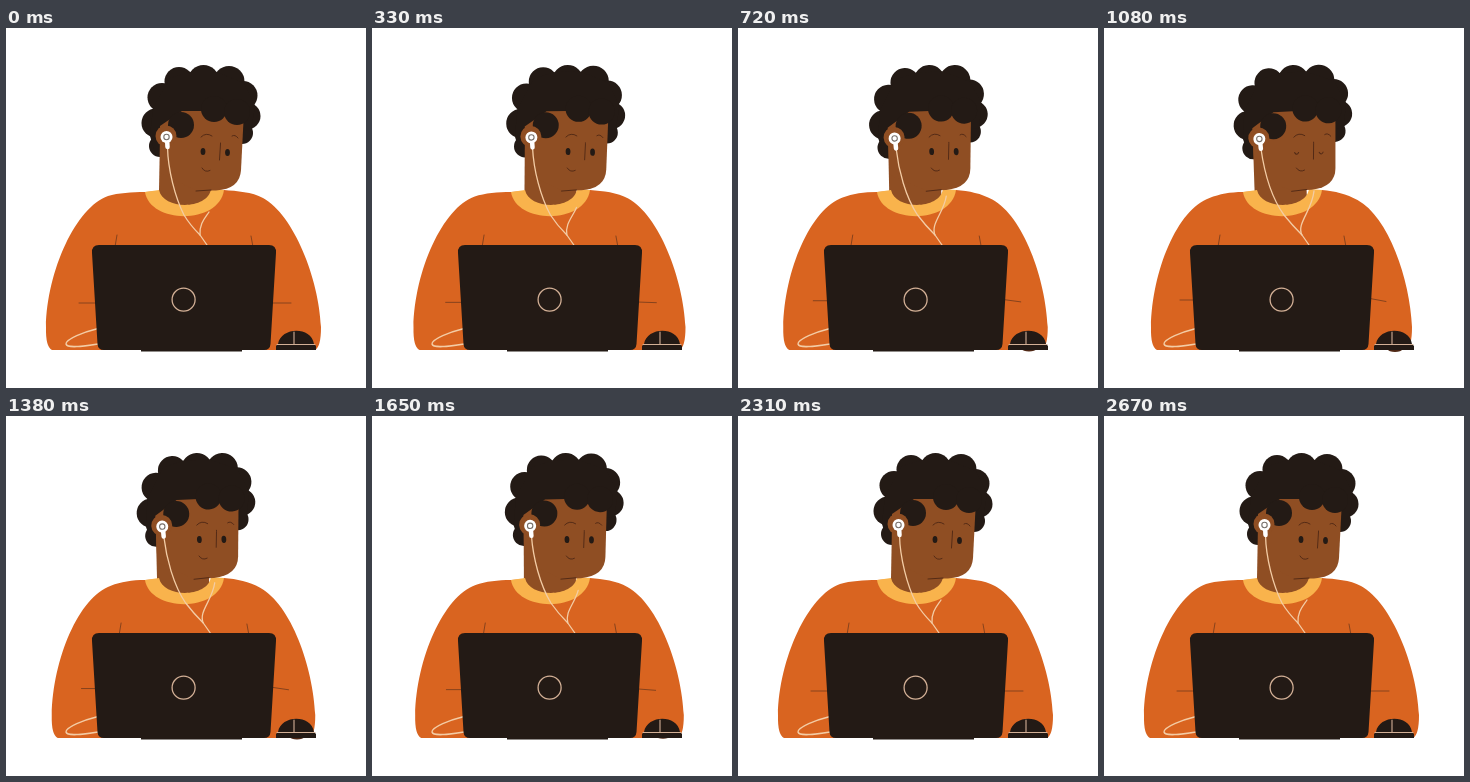
Animation of 360x360 px, one loop 2.7 s. Source, as an HTML page with a canvas:

```html
<!DOCTYPE html>
<html lang="en">
<head>
<meta charset="utf-8">
<title>Listening at the laptop</title>
<style>
html, body { margin: 0; width: 100%; height: 100%; overflow: hidden; background: #fff; }
canvas { display: block; width: 100vmin; height: 100vmin; }
</style>
</head>
<body>
<canvas id="stage" width="360" height="360"></canvas>
<script>
const ctx = document.getElementById('stage').getContext('2d');
const LOOP = 2700, SWAY = 2160;
const DARK = '#231a15', SKIN = '#8f4e23', LINE = '#4f2815', FOLD = '#7d3f1c';
const ORANGE = '#d96420', YELLOW = '#f9b34c', CORD = '#f3cca5', TRIM = '#d3b096';
const TILT = -0.052, PIVOT = [195, 209];

const mix = (a, b, p) => a + (b - a) * p;

function fill(color, d) {
  ctx.fillStyle = color;
  ctx.fill(new Path2D(d));
}

function line(color, width, d) {
  ctx.strokeStyle = color;
  ctx.lineWidth = width;
  ctx.stroke(new Path2D(d));
}

function oval(color, x, y, rx, ry = rx) {
  ctx.fillStyle = color;
  ctx.beginPath();
  ctx.ellipse(x, y, rx, ry, 0, 0, Math.PI * 2);
  ctx.fill();
}

function ring(color, width, x, y, r) {
  ctx.strokeStyle = color;
  ctx.lineWidth = width;
  ctx.beginPath();
  ctx.arc(x, y, r, 0, Math.PI * 2);
  ctx.stroke();
}

function tilted(p, draw) {
  ctx.save();
  ctx.translate(...PIVOT);
  ctx.rotate(TILT * p);
  ctx.translate(-PIVOT[0], -PIVOT[1]);
  draw();
  ctx.restore();
}

function backOfHead() {
  const curls = [
    [173, 53.5, 14.5], [197.5, 52.5, 15.5], [223, 53.5, 15.5], [237, 67.5, 14.5],
    [241, 88, 13.5], [236, 105, 11], [156, 69.5, 14.5], [150, 95, 14.5], [154, 118, 11]
  ];
  for (const [x, y, r] of curls) oval(DARK, x, y, r);
  fill(DARK, 'M147 80L164 50L185 44L211 44L238 55L249 78L245 102L200 105L150 128L144 108Z');
  fill(SKIN, 'M154 108H205V190H152.5Z');
}

function body(p) {
  const s = 7 * p, drop = 2 * p;
  fill(ORANGE, `M139 164C126 164 ${112 + s / 2} ${165 + drop / 2} ${102 + s / 2} ${168 + drop}
    C${70 + s / 2} ${179 + drop} ${41 + s} 243 ${40 + s} 299
    Q${39.5 + s} 319 ${46 + s} 322H${309 - s}Q${315 - s} 319 ${315 - s} 299
    C${313 - s} 251 ${288 - s / 2} ${187 + drop} ${257 - s / 2} ${170 + drop}
    C${246 - s / 2} ${164 + drop} 231 163 218 162L205 162C205 183 155 183 153 163Z`);
  fill(YELLOW, 'M139 164C144 196 213 197 218 162L205 161C202 182 157 182 153 162Z');
  const sleeve = 5 * p, fold = 3 * p;
  line(FOLD, 0.9, `M${111 + sleeve} 207L${109 + sleeve} 219M${245 - sleeve} 208L${247 - sleeve} 219
    M${73 + fold} ${275 - fold}H90M266 ${275 - 1.5 * fold}L${285 - fold} ${275 - fold / 2}`);
}

function face(open) {
  fill(SKIN, 'M154 98L176 83H238L235 142Q234 161 210 162.5H190L154 145Z');
  oval(DARK, 175, 97, 13);
  oval(DARK, 208, 81, 13);
  oval(DARK, 231, 84, 13);
  oval(SKIN, 160, 108, 10.5);
  line(LINE, 0.9, `M190 163L205 162M195 109Q200 104 206 108M226 108Q229 106 232 110
    M214.5 115V116L213.500 132M196 140Q199 145 204 142.5`);
  if (open > 0.15) {
    oval(DARK, 197, 123.5, 2.4, 3.6 * open);
    oval(DARK, 221.5, 124.5, 2.4, 3.6 * open);
  } else {
    line(LINE, 1, 'M195 124.5Q197 128 199 124.5M219.500 125.5Q221.500 129 223.500 125.5');
  }
}

function earbud() {
  line('#fff', 4.5, 'M161 110L161.5 119');
  oval('#fff', 160.5, 109, 6);
  ring('#77706b', 1.1, 160.5, 109, 2.7);
}

function cords(p) {
  const x = mix(194, 198, p);
  line(CORD, 1.3, `M${mix(161.5, 157, p)} ${mix(119, 121, p)}
    C${mix(162, 160, p)} 142 ${mix(169, 167, p)} 169 ${mix(178, 180, p)} 187
    Q${mix(184, 188, p)} 197 ${x} 207L${mix(201, 205, p)} 217`);
  line(CORD, 1.3, `M${mix(203, 210, p)} ${mix(184, 163, p)}
    C${mix(199, 208, p)} ${mix(190, 183, p)} ${mix(193, 192, p)} 196 ${x} 207`);
}

function desk(p) {
  line(CORD, 1.4, 'M92 300.5C78 304 60 311 60 316C61 321 79 318 92 316');
  fill(DARK, `M93 217H263Q270.5 217 270 225L264.5 316Q264 322 258 322H236V323.5H135V322H98
    Q92 322 91.5 316L86 225Q85.5 217 93 217Z`);
  ring(TRIM, 1.3, 177.6, 271.7, 11.5);
  oval(LINE, 291, 319 + 2.5 * p, 7, 2.5);
  fill(DARK, 'M270 322V318L272 316C275 299 305 298 308 316L310 318V322Z');
  line(TRIM, 1.1, 'M271 316.5H309M288 304V316');
}

function draw(t) {
  const p = t < SWAY ? (1 - Math.cos(Math.PI * 2 * t / SWAY)) / 2 : 0;
  const open = Math.min(1, Math.max(0, (Math.abs(t - 1100) - 70) / 80));
  ctx.fillStyle = '#fff';
  ctx.fillRect(0, 0, 360, 360);
  tilted(p, backOfHead);
  body(p);
  tilted(p, () => face(open));
  cords(p);
  tilted(p, earbud);
  desk(p);
}

ctx.lineCap = 'round';
ctx.lineJoin = 'round';
const start = performance.now();
function tick() {
  draw((performance.now() - start) % LOOP);
  requestAnimationFrame(tick);
}
tick();
</script>
</body>
</html>
```
